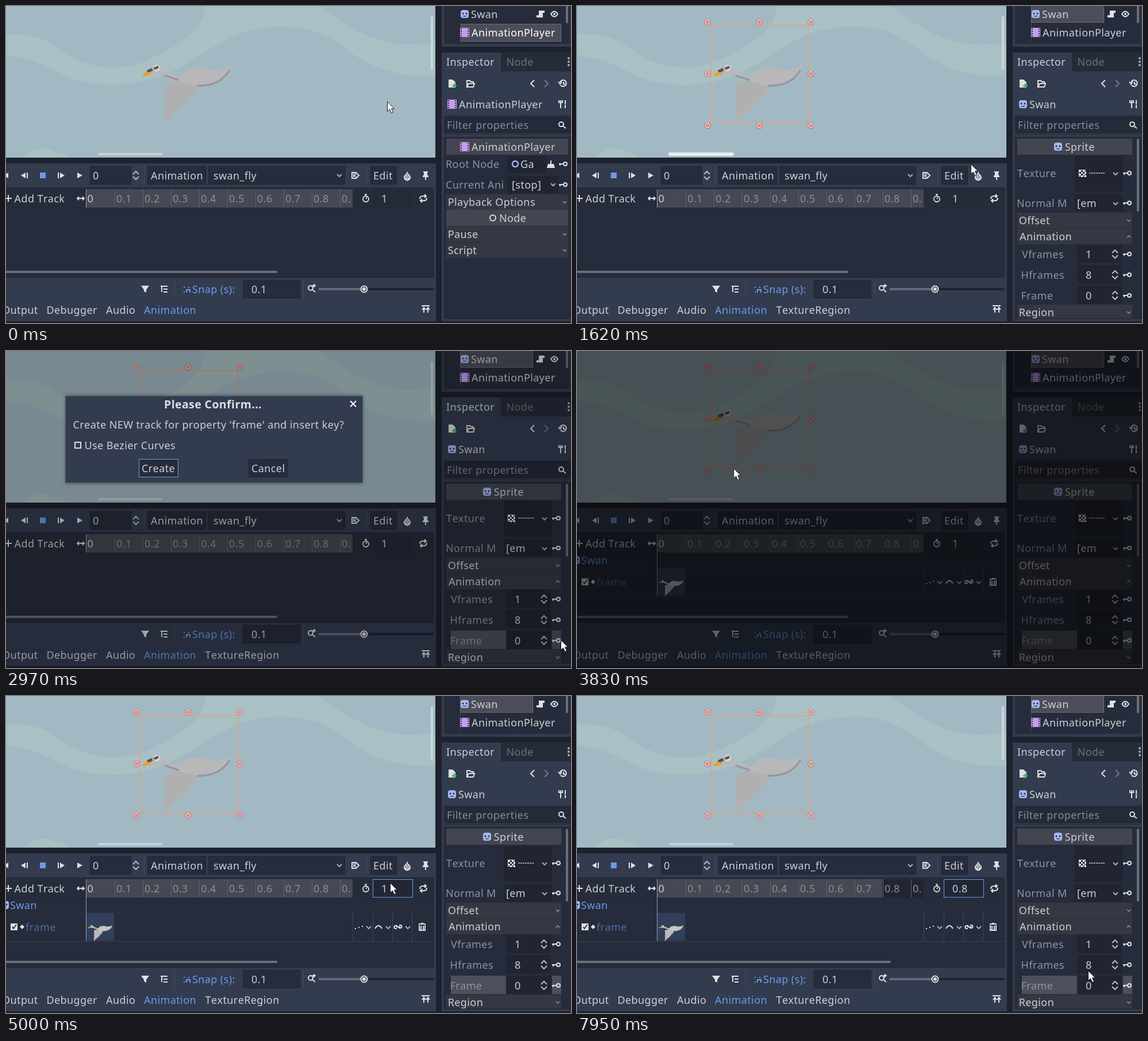
An HTML page with a canvas that plays this animation: 983 px wide and 552 px high, repeating every 8 s.

```html
<!DOCTYPE html>
<html lang="en">
<head>
<meta charset="utf-8">
<title>Animation editor</title>
<style>
html, body { margin: 0; width: 100%; height: 100%; overflow: hidden; background: #1e222d; }
canvas { display: block; }
</style>
</head>
<body>
<canvas id="stage" width="983" height="552"></canvas>
<script>
const c = document.getElementById('stage').getContext('2d');
const LOOP = 8000;
const PANEL = '#333b4f', BOX = '#262c3b', DARK = '#202531', GAP = '#1e222d';
const HEAD = '#434651', SECTION = '#343843', TEXT = '#cdcfd4', DIM = '#8f939c', BLUE = '#699ce8', ICON = '#e0e0e0';

const rect = (x, y, w, h, color) => { c.fillStyle = color; c.fillRect(x, y, w, h); };
const frame = (x, y, w, h, color) => { c.strokeStyle = color; c.lineWidth = 1; c.strokeRect(x + .5, y + .5, w - 1, h - 1); };
const text = (s, x, y, color = TEXT, font = '18px') => {
  c.font = font + ' "Noto Sans", sans-serif';
  c.letterSpacing = '0.4px';
  c.fontKerning = 'none';
  c.fillStyle = color;
  c.fillText(s, x, y);
};
// Icons: SVG path data relative to (x, y); line width 0 means filled.
const icon = (d, x, y, color = ICON, width = 2) => {
  c.save();
  c.translate(x, y);
  const p = new Path2D(d);
  if (width) { c.strokeStyle = color; c.lineWidth = width; c.stroke(p); }
  else { c.fillStyle = color; c.fill(p); }
  c.restore();
};
const disc = (x, y, r, color) => { c.fillStyle = color; c.beginPath(); c.arc(x, y, r, 0, 7); c.fill(); };
const ring = (x, y, r, color = ICON, w = 2) => { c.strokeStyle = color; c.lineWidth = w; c.beginPath(); c.arc(x, y, r, 0, 7); c.stroke(); };
const bar = (x, y, w, h, color) => { c.fillStyle = color; c.beginPath(); c.roundRect(x, y, w, h, Math.min(w, h) / 2); c.fill(); };
const vline = (x, y, h, color = '#454c5e') => rect(x, y, 1, h, color);

const chevron = (x, y, color = '#a9acb4') => icon('M-4-2L0 2L4-2', x, y, color);
const spinner = (x, y) => icon('M-5-2L0-7L5-2M-5 2L0 7L5 2', x, y, '#b9bbc1');
const key = (x, y) => { ring(x + 4, y, 3); icon('M-7 0H1M-5 0V3', x, y); };
const film = (x, y) => {
  rect(x - 8, y - 8, 16, 16, '#c69ced');
  for (let i = -7; i < 8; i += 4) { rect(x - 7, y + i, 2, 2, BOX); rect(x + 5, y + i, 2, 2, BOX); }
};
const face = (x, y) => {
  c.fillStyle = '#a5b7f3'; c.beginPath(); c.roundRect(x - 7, y - 7, 14, 14, 4); c.fill();
  disc(x - 3, y - 1, 1.5, BOX); disc(x + 3, y - 1, 1.5, BOX);
  icon('M-3 3Q0 5 3 3', x, y, BOX, 1.3);
};

function swan(x, y, k, body, wing) {
  c.save();
  c.translate(x, y);
  c.scale(k, k);
  icon('M-41 18L-16 11L14 20Q13 31 9 37L-1 45L-8 54L-15 62L-26 69L-32 75L-38 83L-42 86Q-39 60-41 18Z', 0, 0, wing, 0);
  icon('M-68-4Q-64-14-55-15Q-47-14-45-5L-16 6L-3-6Q10-10 24-10Q34-5 45-5Q60-5 73-13Q73-2 62 8Q50 20 27 23L13 22L-17 14L-38 6L-52 2L-68 3Z', 0, 0, body, 0);
  icon('M-42 4L-17 12M14 22Q42 22 56 11Q66 3 71-6', 0, 0, '#96959c', 3);
  disc(-56, -9, 6, '#d2d3d4');
  icon('M-82 4L-75-2L-65-3L-66 2L-77 5Z', 0, 0, '#eda024', 0);
  icon('M-73-5L-65-9L-62-5L-67-2L-72-2ZM-62-9L-54-13L-52-9L-59-6Z', 0, 0, '#55555a', 0);
  c.restore();
}

function viewport(t, selected) {
  rect(0, 0, 747, 264, '#a2b9c4');
  icon('M0 50C55 46 75 62 106 84C150 112 210 116 260 88C312 62 345 40 347 0H545C585 30 640 70 708 67Q730 66 747 65V121C690 125 650 112 610 88C570 56 540 37 485 36C400 36 370 68 320 96C260 136 175 152 105 122C70 105 50 92 0 86Z', 0, 0, '#a9c1c4', 0);
  icon('M32 264Q48 247 67 248Q78 248 86 255Q98 254 109 264Z', 0, 0, '#a9c1c4', 0);
  swan(318, 117, 1, '#b8b8b9', '#b0b0b0');
  if (selected) {
    c.strokeStyle = '#ec9f7a'; c.lineWidth = 1.6; c.strokeRect(232.8, 34, 170, 169);
    for (const x of [227, 317, 407]) for (const y of [28, 118, 208]) {
      if (x == 317 && y == 118) continue;
      disc(x, y, 5.5, '#665b62'); disc(x, y, 4.7, '#fff'); disc(x, y, 3.6, '#ff7d7d');
    }
  }
  bar(739, 18, 4, 93, '#c9d8dc');
  if (t > 1580 && t < 1660) bar(159, 255, 114, 6, '#e6edef');
  else bar(160, 256, 112, 4, '#c5d4d9');
}

function sceneTree(selected) {
  rect(758, 0, 225, 71, PANEL);
  rect(762, 0, 219, 66, BOX);
  const [y, w] = selected ? [-2, 127] : [31, 176];
  rect(790, y, w, 31, '#4b4e5a');
  frame(790, y, w, 31, '#6a6d77');
  rect(790, 29, 1, 34, '#3b4150');
  face(798, 14);
  film(798, 46);
  text('Swan', 809, 21);
  text('AnimationPlayer', 810, 53, selected ? TEXT : '#fff');
  icon('M-3-6H7V-2H4V6H-7V2H-3Z', 930, 14, ICON, 0);
  icon('M-6 0Q0-9 6 0Q0 9-6 0Z', 954, 14);
  disc(954, 14, 2, ICON);
  bar(974, -8, 4, 38, '#6a6e78');
}

const header = (y, w) => rect(766, y, w, 28, HEAD);
function section(s, y, w, up) {
  rect(766, y, w, 27, SECTION);
  text(s, s[0] == 'A' ? 770 : 768.7, y + 20);
  icon(up ? 'M-3 2L0-1L3 2' : 'M-3-1L0 2L3-1', 760 + w, y + 13, '#8d919b', 1.6);
}

function playerProps() {
  header(231, 212);
  film(798, 245);
  text('AnimationPlayer', 810, 252);
  text('Root Node', 765, 282, DIM);
  rect(872, 261, 68, 30, DARK);
  ring(886, 275, 5, '#a5b7f3', 2.4);
  text('Ga', 895, 282);
  icon('M-1-7H1V-1H5L7 6H-7L-5-1H-1Z', 948, 276, ICON, 0);
  key(969, 275);
  text('Current Ani', 765, 318, DIM);
  rect(872, 296, 90, 30, DARK);
  text('[stop]', 880, 318);
  chevron(952, 311);
  key(969, 311);
  section('Playback Options', 328, 212);
  header(355, 212);
  ring(847, 369, 5);
  text('Node', 858, 376);
  section('Pause', 384, 212);
  section('Script', 412, 212);
}

function spriteProps(t) {
  header(231, 200);
  face(837, 245);
  text('Sprite', 848.7, 252);
  text('Texture', 766, 298, DIM);
  rect(866, 261, 84, 62, DARK);
  frame(873, 285, 12, 12, ICON);
  for (let i = 0; i < 8; i++) rect(874 + i % 4 * 3, 286 + (i % 2) * 3 + (i > 3) * 6, 3, 3, ICON);
  for (let x = 891; x < 918; x += 4) rect(x, 290, 3, 2, '#9a9ca2');
  chevron(937, 292);
  key(957, 291);
  text('Normal M', 765, 350, DIM);
  rect(866, 328, 84, 30, DARK);
  text('[em', 870, 350);
  chevron(937, 344);
  key(957, 343);
  section('Offset', 360, 200);
  section('Animation', 388, 200, true);
  if (t >= 2790) rect(774, 487, 96, 32, '#4d505c');
  if (t >= 2600) rect(950, 487, 16, 32, '#4d505c');
  [['Vframes', 1], ['Hframes', 8], ['Frame', 0]].forEach(([name, value], i) => {
    const y = 432 + i * 36;
    rect(870, y - 17, 78, 32, DARK);
    text(name, i ? 772.5 : 774, y + 7, DIM);
    text(value, 885, y + 7);
    spinner(936, y);
    key(957, y);
  });
  section('Region', 520, 200);
  bar(974, 231, 4, 127, '#6a6e78');
}

function inspector(t, selected) {
  rect(758, 81, 225, 33, '#262b38');
  rect(758, 81, 103, 34, PANEL);
  rect(758, 114, 225, 435, PANEL);
  text('Inspector', 766, 104);
  text('Node', 870.5, 104, '#6b707c');
  for (const y of [91, 97, 103]) disc(979, y, 2, '#a9acb4');
  icon('M-6-7H1L6-2V7H-6Z', 776, 135, ICON, 0);
  icon('M3 0V8M-1 4H7', 777, 135, '#37b36b', 2.5);
  icon('M-6 6V-5H-1L1-3H5V0M-6 6L-3 0H7L5 6Z', 808, 135);
  icon('M3-6L-3 0L3 6', 916, 135);
  icon('M-3-6L3 0L-3 6', 940, 135, '#737986');
  icon('M-4 3A5.5 5.5 0 1 0-5-2M-8-3L-5 1L-2-3M1-3V1H4', 969, 135);
  if (selected) face(776, 171); else film(776, 171);
  text(selected ? 'Swan' : 'AnimationPlayer', selected ? 787 : 788, 178);
  icon('M-3-7V-3M-6-7V-3H0V-7M-3-3V7M5-7V0M5 1V7', 968, 171);
  rect(762, 191, 221, 33, '#242a38');
  rect(762, 222, 221, 1, '#3b4254');
  text('Filter properties', 767, 214, '#858a95');
  ring(966, 206, 4);
  icon('M3 3L8 7', 966, 206);
  rect(762, 228, 221, 317, DARK);
  rect(763, 229, 219, 315, BOX);
  c.save();
  c.beginPath(); c.rect(763, 229, 220, 315); c.clip();
  selected ? spriteProps(t) : playerProps();
  c.restore();
}

function toolbar() {
  icon('M4-5L-3 0L4 5Z', 0, 295, ICON, 0);
  icon('M2-5L-6 0L2 5ZM4-5H6V5H4Z', 32, 295, ICON, 0);
  rect(59, 290, 10, 10, BLUE);
  icon('M-2-5L6 0L-2 5ZM-6-5H-4V5H-6Z', 96, 295, ICON, 0);
  icon('M-4-5L5 0L-4 5Z', 128, 295, ICON, 0);
  rect(146, 279, 72, 32, BOX); frame(146, 279, 72, 32, DARK);
  text('0', 151, 302);
  spinner(226, 295);
  vline(240, 279, 32);
  for (const [x, w] of [[246, 102], [352, 238], [634, 46]]) { rect(x, 279, w, 32, BOX); frame(x, 279, w, 32, DARK); }
  text('Animation', 252, 302);
  text('swan_fly', 361, 302);
  chevron(580, 295);
  icon('M-5-5H2L7 0L2 5H-5Z', 607, 295);
  icon('M-2 3V-3H1V0H-2L2 3', 607, 295, ICON, 1.2);
  vline(627, 279, 32);
  text('Edit', 639, 302);
  icon('M0-8Q1-4 5-1A6 6 0 1 1-5-1Q-1-4 0-8Z', 698, 296, ICON, 0);
  icon('M0-3V7M-3 0V5M3 0V5', 698, 295, PANEL, 1);
  icon('M-4-7H4V-5H3V-1L5 1V3H1V8H-1V3H-5V1L-3-1V-5H-4Z', 730, 295, ICON, 0);
}

function lengthField(t) {
  const focus = t >= 4960, edit = t >= 5230 && t < 7220;
  rect(638, 319, 70, 32, focus ? '#212735' : '#242a38');
  if (focus) frame(638, 319, 70, 32, BLUE);
  if (!edit) return text(t < 7220 ? '1' : '0.8', 653, 342);
  const value = t < 5870 ? '1' : t < 5960 ? '0' : t < 6950 ? '0.' : '0.8';
  if (t < 5870) rect(645, 323, 10, 24, '#425987');
  text(value, 644, 342);
  const caret = t < 5870 ? 644 : 644 + Math.round(c.measureText(value).width - .8);
  if (t < 5410 || (t >= 5870 && t < 6420) || t >= 6950) rect(caret, 323, 1, 24, TEXT);
}

function track() {
  face(-2, 364);
  text('Swan', 7, 371, BLUE);
  rect(0, 377, 743, 1, '#2b3243');
  rect(0, 427, 743, 1, '#3a4152');
  rect(140, 378, 48, 48, '#313f59');
  swan(164.5, 403, .28, '#c6c6c4', '#b9b9b9');
  rect(8, 396, 12, 12, ICON);
  icon('M-3 0L-1 3L4-4', 14, 402, BOX, 1.8);
  icon('M0-4L4 0L0 4L-4 0Z', 28, 402, ICON, 0);
  text('frame', 34, 409, '#4d6ba3');
  for (const x of [603, 638, 672, 706]) vline(x, 377, 50, '#3d4455');
  for (const [x, y] of [[607, 404], [613, 402], [619, 400]]) rect(x, y, 2, 2, ICON);
  icon('M-6 3Q0-7 6 3', 648, 402);
  icon('M-2 3H-4A2.5 2.5 0 0 1-4-2H-1M2-3H4A2.5 2.5 0 0 1 4 2H1M-3 0H4', 682, 402);
  for (const x of [631, 665, 699]) chevron(x, 403);
  icon('M-6-5H6M-2-6H2M-5-3V6H5V-3M-2-2V5M2-2V5', 724, 402);
}

function timeline(t) {
  rect(0, 316, 744, 157, DARK);
  rect(0, 317, 743, 155, BOX);
  rect(0, 351, 743, 1, '#222735');
  text('Add Track', 14.6, 342);
  icon('M-6 0H6M0-6V6', 4, 335);
  icon('M-6 0H6M-3-3L-6 0L-3 3M3-3L6 0L3 3', 130, 335, ICON, 1.8);
  const end = t < 7220 ? 603 : 531;
  rect(139, 319, 464, 32, DARK);
  rect(139, 319, end - 139, 32, '#464954');
  for (let i = 0; i < 10; i++) {
    const x = Math.round(140.4 + i * 49);
    if (i) vline(x, 319, 32, '#5d6069');
    const label = i == 0 ? '0' : i == 9 ? '0.' : '0.' + i;
    text(label, x + (i ? 3 : 1.5), 342, i ? '#8b8e96' : TEXT);
  }
  const tracked = t >= 3830;
  ring(626, 336, 5, ICON, 1.8);
  icon('M-2-8H2M0-8V-5M0 0L2-3', 626, 336, ICON, 1.6);
  lengthField(t);
  icon('M-6 1Q-6-4-1-4H4M2-7L5-4L2-1M6-1Q6 4 1 4H-4M-2 1L-5 4L-2 7', 726, 335);
  if (tracked) track();
  vline(139, 319, tracked ? 108 : 32, '#8a9fc4');
  bar(-9, 461, t < 7220 ? 481 : 555, 4, '#6a6e78');
}

function footer(selected) {
  icon('M-7-6H7L2 1V6L-2 4V1Z', 242, 493, ICON, 0);
  icon('M-6-5H6M-1 0H6M-1 5H6M-4-5V5', 275, 493);
  vline(293, 477, 32);
  for (const [x, y] of [[309, 489], [309, 497], [313, 493], [317, 489]]) rect(x, y, 2, 2, BLUE);
  icon('M-3 5V0H3V5', 317, 494, BLUE);
  text('Snap (s):', 324, 500, BLUE);
  rect(412, 477, 100, 32, BOX); frame(412, 477, 100, 32, DARK);
  text('0.1', 427, 500);
  vline(517, 477, 32);
  ring(530, 491, 4);
  icon('M3 3L8 7M3-4H9M6-7V-1', 530, 491);
  rect(544, 491, 79, 4, '#646a78');
  rect(623, 491, 121, 4, '#1f2430');
  disc(623, 493, 6.5, ICON); disc(623, 493, 4.5, PANEL); disc(623, 493, 3, ICON);
  text('Output', -7, 536);
  text('Debugger', 70.5, 536);
  text('Audio', 174, 536);
  text('Animation', 240, 536, BLUE);
  if (selected) text('TextureRegion', 346.5, 536);
  icon('M-7-6H7M-3 6V-2M-6 1L-3-3L0 1M4 6V-2M1 1L4-3L7 1', 730, 528);
}

function dialog() {
  c.save();
  c.shadowColor = 'rgba(0,0,0,.5)'; c.shadowBlur = 6;
  rect(104, 78, 516, 152, PANEL);
  c.restore();
  frame(103, 78, 518, 152, '#525a69');
  text('Please Confirm...', 275, 100, '#dcdee2', 'bold 19.5px');
  icon('M-5-5L5 5M5-5L-5 5', 604, 92, '#fff');
  text("Create NEW track for property 'frame' and insert key?", 116.5, 135);
  c.strokeStyle = ICON; c.lineWidth = 2; c.strokeRect(120, 159, 10, 10);
  text('Use Bezier Curves', 136.5, 171);
  rect(231, 188, 69, 32, BOX); frame(231, 188, 69, 32, BLUE);
  text('Create', 236, 211);
  rect(422, 188, 68, 32, BOX); frame(422, 188, 68, 32, DARK);
  text('Cancel', 427, 211);
}

// Pointer stops: time, x, y.
const stops = [[90, 663, 166], [870, 811, 19], [1270, 811, 19], [1620, 685, 275], [1980, 798, 391],
  [2130, 798, 391], [2640, 965, 503], [3080, 965, 503], [3590, 273, 204], [3930, 272, 204],
  [4400, 172, 410], [4460, 172, 410], [4980, 668, 325], [5030, 668, 325], [5260, 679, 328], [7640, 679, 328]];
const bezier = (a, b, d, e, u) => {
  const v = 1 - u;
  return a * v * v * v + 3 * b * v * v * u + 3 * d * v * u * u + e * u * u * u;
};
function pointer(t) {
  if (t >= 7640) {
    const u = Math.min(1, (t - 7640) / 310);
    return [bezier(679, 780, 1020, 889, u), bezier(328, -5, 200, 478, u)];
  }
  const i = stops.findIndex(s => s[0] > t);
  if (i == 0) return stops[0].slice(1);
  const [t0, x0, y0] = stops[i - 1], [t1, x1, y1] = stops[i];
  const u = (t - t0) / (t1 - t0), e = u * u * (3 - 2 * u);
  return [x0 + (x1 - x0) * e, y0 + (y1 - y0) * e];
}

function draw(t) {
  const selected = t >= 930;
  rect(0, 0, 983, 552, GAP);
  viewport(t, selected);
  rect(0, 274, 748, 275, PANEL);
  toolbar();
  timeline(t);
  footer(selected);
  sceneTree(selected);
  inspector(t, selected);
  const fade = t < 3830 ? (t - 2790) / 400 : (3940 - t) / 110;
  const shade = .57 * Math.max(0, Math.min(1, fade));
  if (shade) rect(0, 0, 983, 552, `rgba(0,0,0,${shade})`);
  if (t >= 2790 && t < 3830) dialog();
  const [x, y] = pointer(t), arrow = 'M0 0V17L4 13.5L7 20L10 18.7L7 12.3H12Z';
  icon(arrow, x + .5, y + .5, '#fff', 0);
  icon(arrow, x + .5, y + .5, '#16181d', 1);
}

function tick(now) {
  draw(now % LOOP);
  requestAnimationFrame(tick);
}
draw(0);
requestAnimationFrame(tick);
</script>
</body>
</html>
```
